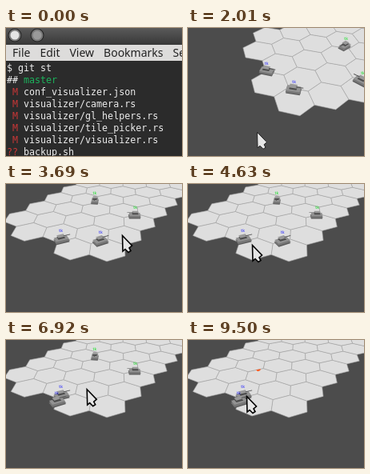
These frames come from a looping animation (220 px wide and 160 px high, 9.53 s). An HTML page with a canvas:

```html
<!DOCTYPE html>
<html lang="en">
<head>
<meta charset="utf-8">
<style>
html, body { margin: 0; width: 220px; height: 160px; overflow: hidden; background: #4c4c4c; }
canvas { display: block; }
</style>
</head>
<body>
<canvas id="stage" width="220" height="160"></canvas>
<script>
const g = document.getElementById('stage').getContext('2d');
const LOOP = 9530, FLIGHT = 180;
const DEG = Math.PI / 180;
const BLUE = '#2020ff', GREEN = '#10e020';
const lerp = (a, b, k) => a + (b - a) * k;
const part = (t, from, to) => Math.min(1, Math.max(0, (t - from) / (to - from)));
const smooth = k => k * k * (3 - 2 * k);
const polar = (angle, r = 1) => [r * Math.cos(angle * DEG), r * Math.sin(angle * DEG)];

// Ground units are tile widths; the axes are those of the final view
const CORNER = polar(39.5, 0.5), ROW = 56;

// Cursor moves: start, end, x, y
const moves = [
  [0, 0, 70, 145], [1610, 2550, 111, 106], [2590, 3070, 112, 77], [3290, 3690, 145, 64],
  [3730, 4210, 89, 77], [4250, 4420, 80, 76], [4630, 5350, 109, 69], [5350, 6030, 155, 42],
  [6360, 7280, 73, 71], [7320, 7800, 109, 24], [8060, 8980, 73, 70]
];

const tank = { color: BLUE, heading: 25, size: 1, at: () => [-0.945, 0.61] };
const mover = {
  color: BLUE, heading: 30, size: 1,
  at(t) {
    const a = part(t, 4630, 5350), b = part(t, 5350, 6030);
    return [0.19 - 0.69 * a - 0.53 * b, 0.52 + 0.52 * a - 0.78 * b];
  }
};
const near = { color: GREEN, heading: 180, size: 0.95, at: () => [1.36, 2.14] };
const far = { color: GREEN, heading: 265, size: 0.95, at: () => [0.03, 3.33] };
const units = [far, near, tank, mover];
const shots = [
  { start: 6930, from: tank, to: near },
  { start: 9020, from: tank, to: far },
  { start: 9420, from: mover, to: far }
];

// The camera turns and tilts while the map is dragged
function cameraAt(t) {
  const k = part(t, 1610, 2550);
  const turn = -75 * (1 - k) * DEG, tilt = lerp(51, 35, k) * DEG;
  const ct = Math.cos(turn), st = Math.sin(turn), c = Math.cos(tilt), s = Math.sin(tilt);
  return ([x, y], z = 0) => {
    const p = x * ct - y * st, q = x * st + y * ct;
    const zoom = 360 / (8 + q * c - z * s);
    return [110 + p * zoom, 90 - (q * s + z * c) * zoom];
  };
}

function poly(points, fill, stroke, width) {
  g.beginPath();
  points.forEach(p => g.lineTo(...p));
  g.closePath();
  g.fillStyle = fill;
  g.fill();
  if (!stroke) return;
  g.strokeStyle = stroke;
  g.lineWidth = width;
  g.stroke();
}

function text(str, x, y, font, color) {
  g.font = font;
  g.fillStyle = color;
  g.fillText(str, x, y);
}

function drawMap(view) {
  const [vx, vy] = polar(ROW), [wx, wy] = polar(ROW + 60);
  for (let col = 0; col < 5; col++) {
    for (let n = 0; n < 11; n++) {
      const i = n - Math.ceil(col / 2);
      const x = CORNER[0] + vx * i + wx * col, y = CORNER[1] + vy * i + wy * col;
      const hex = Array.from({ length: 6 }, (_, m) => {
        const [dx, dy] = polar(ROW + 30 + 60 * m, 1 / Math.sqrt(3));
        return view([x + dx, y + dy]);
      });
      poly(hex, '#dedede', '#a6a6a6', 0.6);
    }
  }
}

function drawTank(view, [x, y], unit) {
  const [c, s] = polar(unit.heading, unit.size);
  // A slab of the vehicle: its extent along and across the heading, and its height
  const slab = (back, front, half, z, color) =>
    poly([[back, -half], [front, -half], [front, half], [back, half]].map(
      ([a, b]) => view([x + a * c - b * s, y + a * s + b * c], z)), color);
  slab(-0.2, 0.2, 0.13, 0.1, '#5c5c5c');
  slab(-0.21, 0.21, 0.13, 0.14, '#777');
  slab(-0.2, 0.19, 0.12, 0.2, '#929292');
  slab(-0.12, 0.09, 0.08, 0.23, '#4c4c4c');
  slab(-0.12, 0.09, 0.08, 0.29, '#999');
  slab(0.06, 0.27, 0.018, 0.27, '#555');
  const [lx, ly] = view([x, y], 0.46);
  g.textAlign = 'center';
  text('tk', lx, ly + 2, '5px "DejaVu Sans", sans-serif', unit.color);
  g.textAlign = 'left';
}

function drawShot(view, t, { start, from, to }) {
  const k = (t - start) / FLIGHT;
  if (k < 0 || k > 2.2) return;
  const a = from.at(t), b = to.at(t);
  const [x, y] = view([lerp(a[0], b[0], k), lerp(a[1], b[1], k)], 0.46);
  poly([[x - 3, y - 0.5], [x + 3, y - 1.5], [x + 2, y + 0.5], [x - 1, y + 1.5]], '#ff5a1e');
}

function drawCursor(t) {
  let x = 0, y = 0;
  for (const [from, to, mx, my] of moves) {
    const k = from === to ? 1 : smooth(part(t, from, to));
    x = lerp(x, mx, k);
    y = lerp(y, my, k);
  }
  const shape = [[0.5, 0.5], [1, 20], [4, 17.5], [8, 21.5], [11, 19.5], [9, 16], [12.5, 13]];
  const dragging = t < 2550;
  poly(shape.map(p => [x + p[0], y + p[1]]), '#e6e6e6', dragging ? '#222' : '#000', dragging ? 1 : 1.6);
}

function drawGame(t) {
  g.fillStyle = '#4c4c4c';
  g.fillRect(0, 0, 220, 160);
  const view = cameraAt(t);
  drawMap(view);
  const alive = unit => !shots.some(s => s.to === unit && t > s.start + FLIGHT);
  units.filter(alive).forEach(unit => drawTank(view, unit.at(t), unit));
  shots.forEach(shot => drawShot(view, t, shot));
  drawCursor(t);
}

function disc(x, r, color) {
  g.beginPath();
  g.arc(x, 9, r, 0, 7);
  g.fillStyle = color;
  g.fill();
}

function drawTerminal() {
  g.fillStyle = '#2b2b2b';
  g.fillRect(0, 0, 220, 160);
  const bar = g.createLinearGradient(0, 0, 0, 21);
  bar.addColorStop(0, '#5a5a5a');
  bar.addColorStop(1, '#383838');
  g.fillStyle = bar;
  g.fillRect(0, 0, 220, 21);
  [[11, '#e4e4e4'], [39, '#999']].forEach(([x, core]) => {
    disc(x, 8.5, '#222');
    disc(x, 7.5, '#777');
    disc(x, 5.5, core);
  });
  g.fillStyle = '#dddcdb';
  g.fillRect(0, 21, 220, 20);
  let x = 8;
  for (const item of ['File', 'Edit', 'View', 'Bookmarks', 'Settings']) {
    text(item, x, 36, '14px "Noto Sans", sans-serif', '#222');
    x += g.measureText(item).width + 12;
  }

  const mono = '11.65px "DejaVu Sans Mono", monospace';
  const white = '#eee', red = '#c83737';
  const files = ['conf_visualizer.json', 'visualizer/camera.rs', 'visualizer/gl_helpers.rs',
    'visualizer/tile_picker.rs', 'visualizer/visualizer.rs', 'backup.sh'];
  text('$ git st', 1, 54, mono, white);
  text('##', 1, 69, mono, white);
  text('master', 22, 69, mono, '#1cb35c');
  files.forEach((name, n) => {
    const y = 84 + n * 15;
    text(n < 5 ? ' M' : '??', 1, y, mono, red);
    text(name, 22, y, mono, white);
  });
}

const begin = performance.now();
function frame() {
  const t = (performance.now() - begin) % LOOP;
  if (t < 430) drawTerminal();
  else drawGame(t);
  requestAnimationFrame(frame);
}
frame();
</script>
</body>
</html>
```
